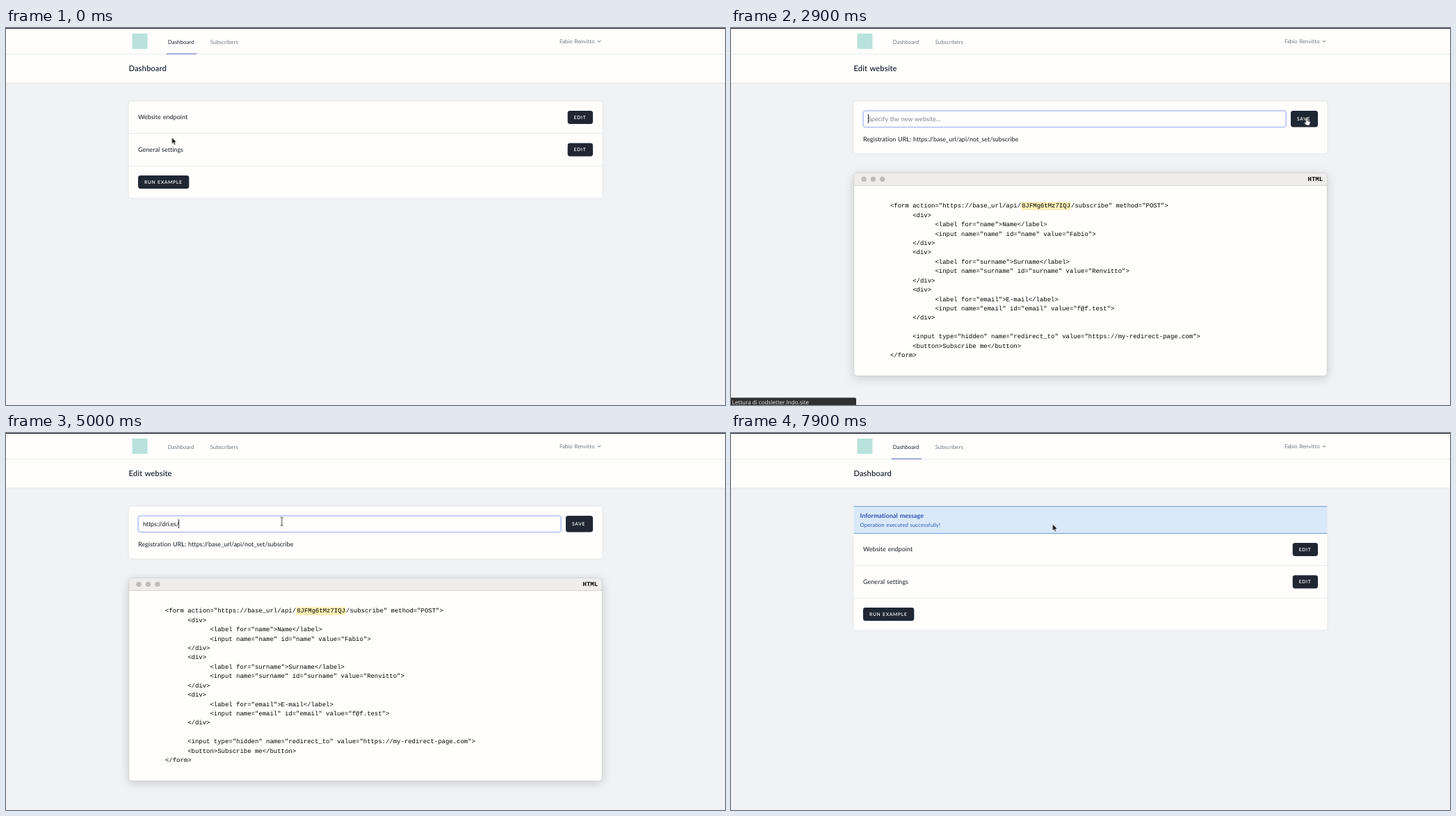
Recreate the animation shown at these times as an HTML page. Size 1034 by 542 pixels, loop 8 s.

```html
<!DOCTYPE html>
<html lang="en">
<head>
<meta charset="utf-8">
<title>Dashboard</title>
<style>
html, body { margin: 0; height: 100%; overflow: hidden; background: #f0f2f4; }
svg { display: block; width: 100vw; height: 100vh; }
text {
  font: 8.96px Lato, "Open Sans", sans-serif;
  letter-spacing: .006em; word-spacing: .06em;
  fill: #16191f; text-rendering: geometricPrecision;
}
.nav { font-size: 7.84px; fill: #70757f; }
.nav.on { fill: #1c2330; }
.title { font-size: 11.2px; font-weight: 600; fill: #1f2733; }
.cap { font-size: 6.72px; font-weight: 600; letter-spacing: .1em; fill: #fff; }
.hint { fill: #7b8088; }
.url { letter-spacing: .003em; }
.note { font-size: 7.84px; fill: #2f5bb7; }
.head { font-weight: 700; fill: #2d52b5; }
.sys { font: 8.1px "Open Sans", "Noto Sans", sans-serif; letter-spacing: 0; word-spacing: 0; fill: #f2f2f2; }
.mono { font: 700 8.96px "Liberation Mono", monospace; letter-spacing: 0; fill: #000; }
pre {
  margin: 0; font: 8.96px/13.44px "Liberation Mono", monospace;
  color: #000; text-rendering: geometricPrecision;
}
mark { background: #fdf0b8; color: inherit; padding: 1px 1.1px; border-radius: 2px; }
.paper { fill: #fffefd; }
.btn { fill: #1f2733; }
.card { filter: drop-shadow(0 .6px .8px rgba(0,0,0,.12)); }
.window { filter: drop-shadow(0 3px 7px rgba(0,0,0,.17)); }
.rule { fill: #e4e6ea; }
.bar { fill: #2f2f2f; }

/* one loop is 8 s, so 1.25% is one 100 ms step */
.a { animation: 8s step-end infinite; }
.dash { animation-name: dash; }
.edit { animation-name: edit; }
.rows { animation-name: rows; }
.done { animation-name: done; }
.head { animation-name: head; }
.hover1 { animation-name: hover1; }
.save { animation-name: save; }
.ring1 { animation-name: ring1; }
.ring2 { animation-name: ring2; }
.empty { animation-name: empty; }
.value { animation-name: value; letter-spacing: -.012em; }
.caret1 { animation-name: caret1; }
.caret2 { animation-name: caret2; }
.list { animation-name: list; }
.pick { animation-name: pick; }
.link { animation-name: link; }
.load { animation-name: load; }
.move { animation-name: move; }
.arrow { animation-name: arrow; }
.hand { animation-name: hand; }
.beam { animation-name: beam; }

@keyframes dash { 0%, 86.25% { opacity: 1 } 35% { opacity: 0 } 100% { opacity: 1 } }
@keyframes edit { 0%, 86.25%, 100% { opacity: 0 } 35% { opacity: 1 } }
@keyframes rows { 0% { transform: none } 86.25%, 100% { transform: translateY(39px) } }
@keyframes done { 0% { opacity: 0 } 86.25%, 100% { opacity: 1 } }
@keyframes head { 0% { opacity: 0 } 87.5%, 100% { opacity: 1 } }
@keyframes hover1 {
  0%, 35%, 100% { fill: #1f2733 }
  17.5% { fill: #2b3442 }
  18.75% { fill: #37404e }
}
@keyframes save {
  0%, 38.75%, 100% { fill: #1f2733 }
  37.5%, 72.5% { fill: #37404e }
  71.25% { fill: #2b3442 }
  80% { fill: #18202c }
}
@keyframes ring1 { 0% { opacity: 1 } 80%, 100% { opacity: 0 } }
@keyframes ring2 { 0% { opacity: 0 } 80%, 100% { opacity: 1 } }
@keyframes empty { 0% { opacity: 1 } 62.5%, 100% { opacity: 0 } }
@keyframes value { 0% { opacity: 0 } 62.5%, 100% { opacity: 1 } }
@keyframes caret1 { 0%, 41.25%, 62.5%, 100% { opacity: 0 } 35%, 50% { opacity: 1 } }
@keyframes caret2 { 0%, 65%, 100% { opacity: 0 } 62.5% { opacity: 1 } }
@keyframes list { 0%, 62.5%, 100% { opacity: 0 } 52.5% { opacity: 1 } }
@keyframes pick { 0%, 62.5%, 100% { opacity: 0 } 61.25% { opacity: 1 } }
@keyframes link { 0%, 33.75%, 100% { opacity: 0 } 21.25% { opacity: .5 } 22.5% { opacity: 1 } }
@keyframes load { 0%, 41.25%, 88.75%, 100% { opacity: 0 } 33.75%, 81.25% { opacity: 1 } }
@keyframes arrow {
  0%, 38.75%, 52.5%, 86.25%, 100% { opacity: 1 }
  17.5%, 46.25%, 62.5% { opacity: 0 }
}
@keyframes hand { 0%, 38.75%, 86.25%, 100% { opacity: 0 } 17.5%, 71.25% { opacity: 1 } }
@keyframes beam { 0%, 52.5%, 71.25%, 100% { opacity: 0 } 46.25%, 62.5% { opacity: 1 } }
@keyframes move {
  0% { transform: translate(238.5px, 157.3px) }
  6.25% { transform: translate(310px, 156px) }
  7.5% { transform: translate(425px, 154px) }
  8.75% { transform: translate(498px, 152.8px) }
  11.25% { transform: translate(590px, 141px) }
  12.5% { transform: translate(656px, 133.5px) }
  15% { transform: translate(735px, 130px) }
  16.25% { transform: translate(798px, 128px) }
  17.5% { transform: translate(827.7px, 129.3px) }
  38.75% { transform: translate(765px, 143px) }
  40% { transform: translate(645px, 149px) }
  41.25% { transform: translate(561.5px, 152.5px) }
  43.75% { transform: translate(548px, 149px) }
  46.25% { transform: translate(423px, 125px) }
  50% { transform: translate(396.6px, 127.3px) }
  67.5% { transform: translate(455px, 130px) }
  68.75% { transform: translate(590px, 134px) }
  70% { transform: translate(720px, 136px) }
  71.25% { transform: translate(812px, 136px) }
  72.5% { transform: translate(833px, 134.5px) }
  76.25% { transform: translate(825px, 134.7px) }
  77.5% { transform: translate(822.5px, 135px) }
  93.75% { transform: translate(700px, 136px) }
  95% { transform: translate(574.5px, 135.5px) }
  97.5% { transform: translate(505px, 133px) }
  98.75%, 100% { transform: translate(462.5px, 131px) }
}
</style>
</head>
<body>
<svg viewBox="0 0 1034 542">
  <rect width="1034" height="542" fill="#f0f2f4"/>

  <!-- header -->
  <g class="card">
    <rect class="paper" width="1034" height="78.6"/>
  </g>
  <rect width="1034" height="1" fill="#17181d"/>
  <rect class="rule" y="37" width="1034" height=".8"/>
  <rect x="181.5" y="8" width="22" height="22" fill="#b9e2dc"/>
  <text class="nav" x="293.8" y="22.6">Subscribers</text>
  <text class="nav" x="796" y="22.3">Fabio Renvitto</text>
  <path d="M851 18l2.1 2.2 2.1-2.2" fill="none" stroke="#5f646d" stroke-width="1"/>

  <!-- dashboard page -->
  <g class="a dash">
    <text class="nav on" x="232.8" y="22.6">Dashboard</text>
    <rect x="230.7" y="36.6" width="43.2" height="1.2" fill="#6679c4"/>
    <text class="title" x="176.5" y="62">Dashboard</text>
    <g class="a rows">
      <rect class="paper card" x="176.5" y="105.5" width="681" height="139" rx="3.4"/>
      <rect class="rule" x="176.5" y="151.2" width="681" height=".8"/>
      <rect class="rule" x="176.5" y="197.7" width="681" height=".8"/>
      <text x="190" y="131.4">Website endpoint</text>
      <text x="190" y="177.9">General settings</text>
      <rect class="btn a hover1" x="807.7" y="119" width="36.3" height="19" rx="3.4"/>
      <rect class="btn" x="807.7" y="165.5" width="36.3" height="19" rx="3.4"/>
      <rect class="btn" x="190" y="212" width="73.3" height="19" rx="3.4"/>
      <text class="cap" x="816.8" y="130.7">EDIT</text>
      <text class="cap" x="816.8" y="177.2">EDIT</text>
      <text class="cap" x="199" y="223.7">RUN EXAMPLE</text>
    </g>
    <g class="a done">
      <rect class="paper" x="176.5" y="140" width="681" height="10"/>
      <rect x="176.5" y="105.3" width="681" height="39.4" fill="#dae9f9"/>
      <rect x="176.5" y="105.2" width="681" height=".9" fill="#5b9acb"/>
      <rect x="176.5" y="143.9" width="681" height=".9" fill="#5b9acb"/>
      <text class="head a" x="185.5" y="122.3">Informational message</text>
      <text class="note" x="185.5" y="134.7">Operation executed successfully!</text>
    </g>
  </g>

  <!-- edit page -->
  <g class="a edit">
    <text class="nav" x="232.8" y="22.6">Dashboard</text>
    <text class="title" x="176.5" y="62">Edit website</text>
    <rect class="paper card" x="176.5" y="105.5" width="681" height="75" rx="3.4"/>
    <rect class="paper" x="190.3" y="119.3" width="607.6" height="23" rx="3.4" stroke="#d3d6dc" stroke-width=".7"/>
    <g class="a ring1" fill="none">
      <rect x="189.6" y="118.6" width="609" height="24.4" rx="4" stroke="#dbe2fa" stroke-width="2"/>
      <rect x="190.3" y="119.3" width="607.6" height="23" rx="3.4" stroke="#a9b8ee" stroke-width=".8"/>
    </g>
    <rect class="a ring2" x="804.1" y="118.1" width="40.8" height="25.2" rx="4.2" fill="none" stroke="#d5d8de" stroke-width="1.8"/>
    <rect class="btn a save" x="805" y="119" width="39" height="23.4" rx="3.4"/>
    <text class="cap" x="814" y="133">SAVE</text>
    <text class="hint a empty" x="197" y="133.7">Specify the new website...</text>
    <text class="a value" x="197" y="133.7">https://dri.es/</text>
    <rect class="a caret1" x="197" y="124" width=".9" height="13" fill="#111"/>
    <rect class="a caret2" x="248.1" y="124" width=".9" height="13" fill="#111"/>
    <text class="url" x="190" y="163.2">Registration URL: https://base_url/api/not_set/subscribe</text>

    <rect class="paper window" x="176.7" y="208.2" width="680.6" height="292" rx="4.5"/>
    <path d="M176.7 226.3v-13.6q0-4.5 4.5-4.5h671.6q4.5 0 4.5 4.5v13.6z" fill="#eeedec"/>
    <rect x="176.7" y="226" width="680.6" height=".7" fill="#c4c5c8"/>
    <rect x="176.7" y="208.2" width="680.6" height="292" rx="4.5" fill="none" stroke="#c4c6ca" stroke-width=".7"/>
    <g fill="#bcbbba">
      <circle cx="191" cy="217.4" r="3.6"/>
      <circle cx="204.4" cy="217.4" r="3.6"/>
      <circle cx="217.8" cy="217.4" r="3.6"/>
    </g>
    <text class="mono" x="829.6" y="220.4">HTML</text>
    <foreignObject x="229" y="250.2" width="600" height="235">
<pre>&lt;form action="https://base_url/api/<mark>8JFMg6tMz7IQJ</mark>/subscribe" method="POST"&gt;
      &lt;div&gt;
            &lt;label for="name"&gt;Name&lt;/label&gt;
            &lt;input name="name" id="name" value="Fabio"&gt;
      &lt;/div&gt;
      &lt;div&gt;
            &lt;label for="surname"&gt;Surname&lt;/label&gt;
            &lt;input name="surname" id="surname" value="Renvitto"&gt;
      &lt;/div&gt;
      &lt;div&gt;
            &lt;label for="email"&gt;E-mail&lt;/label&gt;
            &lt;input name="email" id="email" value="f@f.test"&gt;
      &lt;/div&gt;

      &lt;input type="hidden" name="redirect_to" value="https://my-redirect-page.com"&gt;
      &lt;button&gt;Subscribe me&lt;/button&gt;
&lt;/form&gt;</pre>
    </foreignObject>

    <g class="a list">
      <rect class="bar" x="190" y="142.4" width="608" height="69.4"/>
      <rect class="a pick" x="190" y="155.3" width="601" height="11.2" fill="#484848"/>
      <rect x="790.8" y="142.4" width="7.2" height="69.4" fill="#282828"/>
      <rect x="792.4" y="145" width="3.6" height="44.3" rx="1" fill="#8b8b8b"/>
      <text class="sys" x="194" y="152.4">https://codingadventures.netlify.app</text>
      <text class="sys" x="194" y="163.6">https://dri.es/</text>
      <text class="sys" x="194" y="174.8">https://dri.es</text>
      <text class="sys" x="194" y="186">https://codingadventures.netlify.app/</text>
      <text class="sys" x="194" y="197.2">https://google.it</text>
      <text class="sys" x="194" y="208.4">website</text>
    </g>
  </g>

  <!-- browser status -->
  <g class="a link">
    <path class="bar" d="M0 531.6h152q2 0 2 2V542H0z"/>
    <text class="sys" x="1.6" y="540.5">https://codsletter.lndo.site/edit-website</text>
  </g>
  <g class="a load">
    <path class="bar" d="M0 531.6h178q2 0 2 2V542H0z"/>
    <text class="sys" x="1.6" y="540.5">Lettura di codsletter.lndo.site</text>
  </g>

  <!-- pointer -->
  <g class="a move">
    <path class="a arrow" d="M0 0V9.4L2.2 7.5 3.7 11 5.3 10.3 3.8 7 6.7 6.8Z" fill="#111" stroke="#fff" stroke-width=".6"/>
    <path class="a hand" d="M-1.1.5a1.1 1.1 0 0 1 2.2 0V4l3.1.7q1.2.3 1 1.5l-.7 3.5q-.2 1-1.2 1H0L-3.2 7.4q-.5-1.3.7-1.2L-1.1 7Z" fill="#fff" stroke="#222" stroke-width=".6"/>
    <path class="a beam" d="M-2-6q2 0 2 1 0-1 2-1M0-5V5M-2 6q2 0 2-1 0 1 2 1" fill="none" stroke="#222" stroke-width=".9"/>
  </g>
</svg>
</body>
</html>
```
